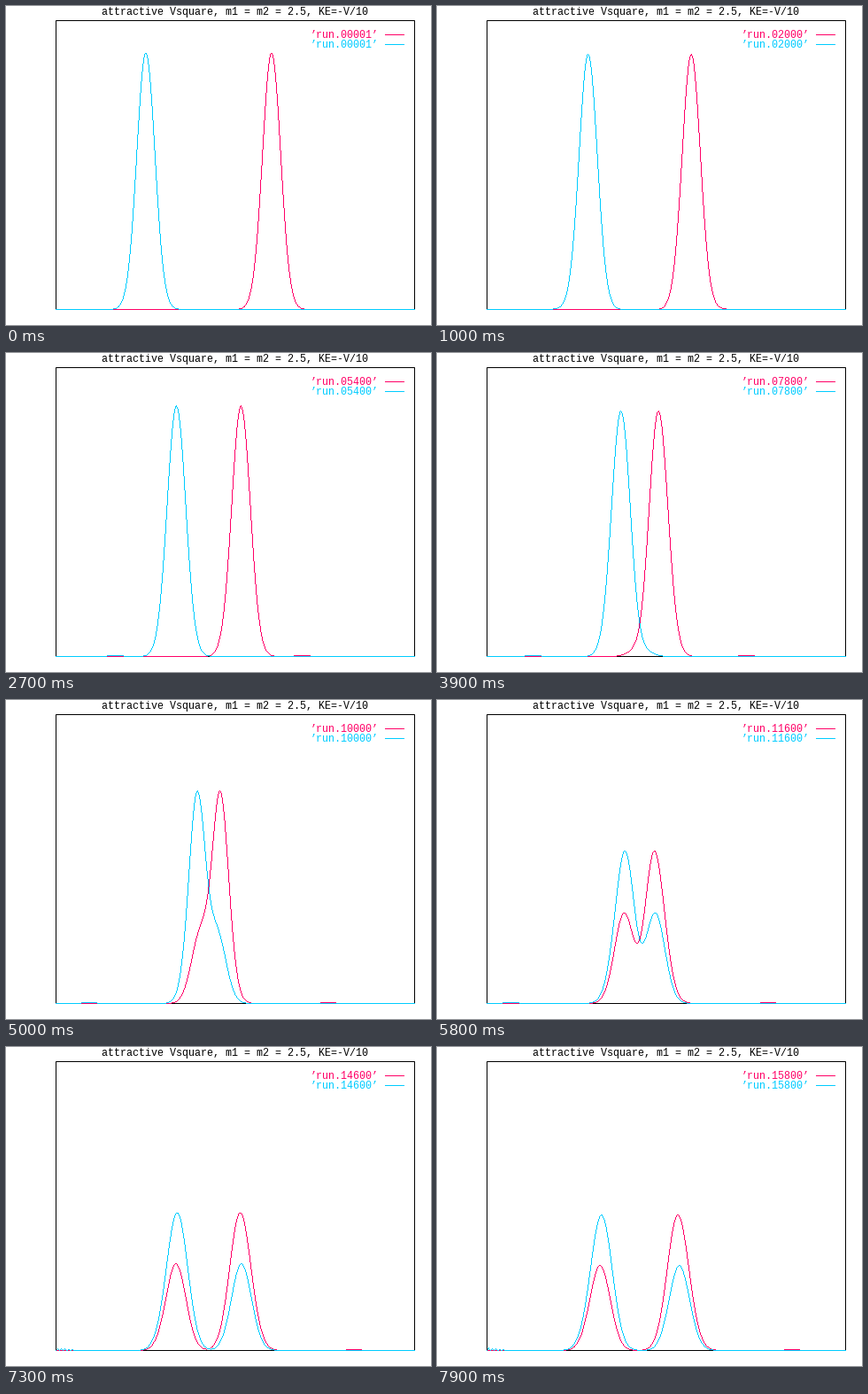
A matplotlib script that plays this animation: 480 by 360 pixels, repeating every 8000 ms.

```python
"""Two wave packets scattering off each other through an attractive square well.

The pair splits into a free centre of mass and a relative coordinate r, whose
wave function is a sum of the exact scattering states of the well.
Lengths are in pixels, times in seconds.
"""
import numpy as np
import matplotlib.pyplot as plt
from matplotlib.animation import FuncAnimation
from matplotlib.patches import Rectangle

W, H, DPI = 480, 360, 80
PX = 72 / DPI
FRAMES, STEP = 80, 100
LEFT, RIGHT, TOP, BASE = 56, 461, 16, 342
RED, CYAN = "#ff0066", "#00ccff"

X1, X2 = 157.5, 299.5        # starting centres
MID = (X1 + X2) / 2
PEAK, SIGMA = 289, 10.25     # starting height and width
HBAR_M = 16.74               # hbar / mass
K0 = 0.764                   # mean wave number
V = HBAR_M * K0
T_SPREAD = 2 * SIGMA**2 / HBAR_M
DEPTH = 10                   # well depth / kinetic energy
HALF = (28 * np.pi + 1.9) / (2 * K0 * np.sqrt(1 + DEPTH))

times = np.arange(FRAMES) * STEP / 1000
xs = np.arange(LEFT, RIGHT + 1)


def spread(t):
    return np.sqrt(1 + (t / T_SPREAD) ** 2)


def scattering_states(k, r):
    """Waves coming from the left, one column for each k."""
    q = np.sqrt(k**2 + DEPTH * K0**2)
    sin, cos = np.sin(2 * q * HALF), np.cos(2 * q * HALF)
    trans = np.exp(-2j * k * HALF) / (cos - 1j * (k**2 + q**2) / (2 * k * q) * sin)
    refl = 1j * (q**2 - k**2) / (2 * k * q) * sin * trans
    fwd = trans / 2 * (1 + k / q) * np.exp(1j * (k - q) * HALF)
    back = trans / 2 * (1 - k / q) * np.exp(1j * (k + q) * HALF)
    r = r[:, None]
    out, inner = np.exp(1j * k * r), np.exp(1j * q * r)
    return np.where(r < -HALF, out + refl / out,
                    np.where(r > HALF, trans * out, fwd * inner + back / inner))


def relative_density():
    sk = 1 / (2 * np.sqrt(2) * SIGMA)
    k = np.linspace(K0 - 6 * sk, K0 + 6 * sk, 181)
    r = np.arange(-340, 340, 0.4)
    amp = np.exp(-((k - K0) / (2 * sk)) ** 2 - 1j * k * (X1 - X2))
    phase = np.exp(-1j * HBAR_M * np.outer(k**2, times))
    rho = np.abs(scattering_states(k, r) @ (amp[:, None] * phase)) ** 2
    return r, rho / rho.sum(axis=0)


def packet_heights():
    """Height of the left packet's curve above the base line, per time."""
    r, rho = relative_density()
    rows = []
    for i, t in enumerate(times):
        s = SIGMA / np.sqrt(2) * spread(t)
        blur = np.exp(-(((xs[:, None] - MID) - r / 2) / s) ** 2 / 2)
        rows.append(blur @ rho[:, i] * PEAK * SIGMA / s)
    return rows


def ghost(t, centre, wall):
    """Faint packet moving outwards, with fringes where it meets the wall."""
    def wave(c):
        return np.exp(-((xs - c) / (2 * SIGMA * spread(t))) ** 2)
    a, b = wave(centre), wave(2 * wall - centre)
    fringes = a**2 + b**2 - 2 * a * b * np.cos(2 * K0 * (xs - wall))
    return 0.77 / spread(t) * fringes


def pixel_runs(height):
    """Top and bottom edge of a one-pixel curve in each pixel column."""
    row = BASE - np.round(height)
    d = np.diff(row)
    to_next = np.append(row[:-1] + np.fix(d / 2), row[-1])
    from_prev = np.append(row[0], row[1:] - np.fix((d - np.sign(d)) / 2))
    ends = np.stack([row, to_next, from_prev])
    return ends.min(axis=0), ends.max(axis=0) + 1


heights = packet_heights()

fig = plt.figure(figsize=(W / DPI, H / DPI), dpi=DPI, facecolor="white")
ax = fig.add_axes([0, 0, 1, 1])
ax.axis("off")


def label(x, y, text, color):
    return ax.text(x, y, text, color=color, va="baseline",
                   family="Liberation Mono", fontsize=11.67 * PX)


ax.add_patch(Rectangle((LEFT + 0.5, TOP + 0.5), RIGHT - LEFT, BASE - TOP,
                       fill=False, ec="black", lw=PX, snap=False))
label(108.5, 10, "attractive Vsquare, m1 = m2 = 2.5, KE=-V/10", "black")

curves, keys = [], []
edges = np.append(xs, RIGHT + 1)
for color, y in ((RED, 32), (CYAN, 43)):
    ax.add_patch(Rectangle((428, y), 22, 1, fc=color, lw=0))
    keys.append(label(344, y + 4, "", color))
    top, bottom = pixel_runs(np.zeros(xs.size))
    curves.append(ax.stairs(top, edges, baseline=bottom, fill=True, color=color,
                            lw=0, zorder=2))
ax.set(xlim=(0, W), ylim=(H, 0))


def update(i):
    t = times[i]
    left = heights[i]
    right = np.interp(2 * MID - xs, xs, left)
    right = right + ghost(t, X2 + V * t, RIGHT)
    left = left + ghost(t, X1 - V * t, LEFT)
    for curve, height in zip(curves, (right, left)):
        top, bottom = pixel_runs(height)
        curve.set_data(values=top, baseline=bottom)
    for key in keys:
        key.set_text(f"’run.{max(1, 200 * i):05d}’")
    return curves + keys


anim = FuncAnimation(fig, update, frames=FRAMES, interval=STEP,
                     repeat=True, repeat_delay=0, blit=False)
plt.show()
```
